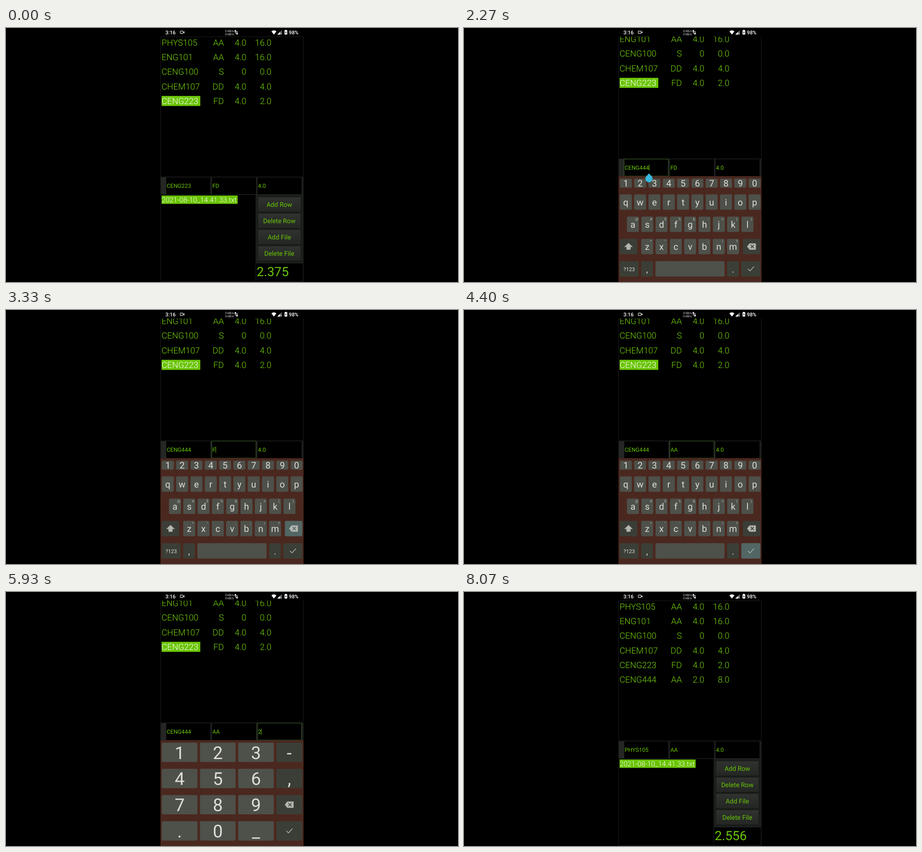
These frames come from a looping animation (998 by 561 pixels, 8.47 s). An HTML page with a canvas:

```html
<!DOCTYPE html>
<html lang="en">
<head>
<meta charset="utf-8">
<title>Grade calculator</title>
<style>
html, body { margin: 0; height: 100%; overflow: hidden; background: #000; }
canvas { display: block; }
</style>
</head>
<body>
<canvas id="stage" width="998" height="561"></canvas>
<script>
const c = document.getElementById('stage').getContext('2d');
c.textRendering = 'geometricPrecision';
const LOOP = 8470, STEP = 200 / 3;
const GREEN = '#6ac507', THIN_GREEN = '#78d60c', MARK = '#69c400', EDGE = '#1c1e1c';
const KEY = '#4e504a', DARK = '#3b3e36', PRESSED = '#526664', INK = '#deded9';
const FIELD_X = [354, 455, 555.5];

// Timelines: [step, value] pairs, each value holding until the next.
const fields = [
  [[0, 'CENG223'], [10, 'CENG22'], [11, 'CENG2'], [12, 'CENG'], [20, 'CENG4'],
   [22, 'CENG44'], [26, 'CENG444'], [108, 'PHYS105']],
  [[0, 'FD'], [49, 'F'], [51, ''], [59, 'A'], [64, 'AA']],
  [[0, '4.0'], [79, '4.'], [80, '4'], [81, ''], [89, '2'], [95, '2.'], [96, '2.0'], [108, '4.0']]
];
const focusAt = [[0, -1], [1, 0], [43, 1], [72, 2], [105, -1]];
const boardAt = [[0, ''], [4, 'abc'], [38, ''], [45, 'abc'], [67, ''], [73, 'num'], [101, '']];
const panAt = [[-9, 0], [4.5, 40], [38, 0], [45.5, 40], [67, 0], [73.5, 40], [101, 0]];
const pressAt = [[0, ''], [9, 'back'], [13, ''], [19, '4'], [20, ''], [25, '4'], [26, ''],
  [36, 'ok'], [38, ''], [48, 'back'], [52, ''], [55, 'shift'], [56, ''], [58, 'A'], [59, ''],
  [60, 'shift'], [61, ''], [63, 'A'], [64, ''], [66, 'ok'], [67, ''], [78, 'back'], [82, ''],
  [88, '2'], [89, ''], [94, '.'], [95, '0'], [96, ''], [100, 'ok'], [101, ''],
  [106, 'Add Row'], [108, '']];
const shiftAt = [[0, false], [56, true], [59, false], [61, true], [64, false]];
const caretAt = [[0, true], [65, false], [72, true], [84, false], [86, true]];
const dropAt = [[0, false], [1, true], [42, false], [43, true], [50, false], [72, true], [79, false]];

const rows = [
  ['PHYS105', 'AA', '4.0', '16.0'], ['ENG101', 'AA', '4.0', '16.0'],
  ['CENG100', 'S', '0', '0.0'], ['CHEM107', 'DD', '4.0', '4.0'],
  ['CENG223', 'FD', '4.0', '2.0'], ['CENG444', 'AA', '2.0', '8.0']
];

const last = (line, k) => line.filter(e => e[0] <= k).pop();
const at = (line, k) => last(line, k)[1];

function panOf(k) {
  const [start, goal] = last(panAt, k);
  const left = 1 - Math.min(1, (k - start) / 2.75);
  return -(goal + (40 - 2 * goal) * left * left);
}

function box(x, y, w, h, fill) {
  c.fillStyle = fill;
  c.fillRect(x, y, w, h);
}

function frame(x, y, w, h, color) {
  c.strokeStyle = color;
  c.lineWidth = 1;
  c.strokeRect(x, y, w, h);
}

function rounded(x, y, w, h, r, fill) {
  c.beginPath();
  c.roundRect(x, y, w, h, r);
  c.fillStyle = fill;
  c.fill();
}

function poly(points, fill) {
  c.beginPath();
  points.forEach(p => c.lineTo(...p));
  c.fillStyle = fill;
  c.fill();
}

function line(points, color, width) {
  c.beginPath();
  points.forEach(p => c.lineTo(...p));
  c.strokeStyle = color;
  c.lineWidth = width;
  c.stroke();
}

// Text with its capitals centred on y.
function text(s, x, y, size, color, align = 'left', weight = 400) {
  c.font = `${weight} ${size}px Roboto, sans-serif`;
  c.textAlign = align;
  c.fillStyle = color;
  c.fillText(s, x, y + size * 0.356);
}

function statusBar() {
  box(341, 0, 316, 19, '#000');
  text('3:16', 352, 10, 11.4, '#fff', 'left', 500);
  c.beginPath();
  c.roundRect(384.7, 6.7, 6.2, 5.6, 1);
  c.strokeStyle = '#ddd';
  c.lineWidth = 1.2;
  c.stroke();
  poly([[391, 9.5], [394, 6.8], [394, 12.2]], '#ddd');
  text('0 kB/s', 484, 6.4, 6.6, '#eee');
  text('0 kB/s', 484, 13.6, 6.6, '#eee');
  line([[506.5, 12], [506.5, 4.5]], '#fff', 1.4);
  poly([[503.8, 7.5], [506.5, 4], [509.2, 7.5]], '#fff');
  line([[510, 7], [510, 14]], '#fff', 1.4);
  poly([[507.3, 11.5], [510, 15], [512.7, 11.5]], '#fff');
  c.beginPath();
  c.moveTo(591.5, 14.5);
  c.lineTo(586, 7.5);
  c.quadraticCurveTo(591.5, 3.2, 597, 7.5);
  c.fillStyle = '#fff';
  c.fill();
  poly([[599, 14.5], [609, 4.8], [609, 14.5]], '#666');
  poly([[599, 14.5], [605, 8.7], [605, 14.5]], '#fff');
  text('x', 607.3, 12.2, 6, '#fff', 'center');
  rounded(615, 5, 6, 9.6, 1, '#fff');
  box(616.7, 4, 2.6, 1.5, '#fff');
  poly([[618.6, 6.3], [616.4, 10.2], [617.8, 10.2], [617.4, 13.2], [619.6, 9.2], [618.2, 9.2]], '#000');
  text('98%', 624.5, 10, 11.3, '#fff', 'left', 500);
}

function app(k, pressed) {
  const done = k >= 108, focus = at(focusAt, k);
  c.save();
  c.beginPath();
  c.rect(341, 19, 316, 542);
  c.clip();
  c.translate(0, panOf(k));

  frame(341.5, 19.5, 315, 540, EDGE);
  rows.slice(0, done ? 6 : 5).forEach((row, i) => {
    const y = 32.6 + 32.05 * i, chosen = i === 4 && !done;
    if (chosen) box(343.5, 150, 85.5, 22.3, MARK);
    text(row[0], 343.5, y, 19, chosen ? '#fff' : THIN_GREEN, 'left', 300);
    [481, 530.5, 586].forEach((x, j) => text(row[j + 1], x, y, 19, THIN_GREEN, 'right', 300));
  });

  box(342, 328.5, 314, 39.5, EDGE);
  box(342, 330, 11.5, 37, '#242724');
  FIELD_X.forEach((x, i) => {
    box(x, 330, 97, 37, '#000');
    if (i === focus) frame(x - 0.5, 329.5, 97.5, 37.5, '#3b5f26');
    const s = at(fields[i], k);
    text(s, x + 0.7, 348.5, 12.5, GREEN);
    if (i === focus && at(caretAt, k)) box(x + 0.7 + c.measureText(s).width, 341.5, 1, 13.5, GREEN);
  });

  frame(341.5, 368, 210, 191.5, EDGE);
  box(343.5, 370, 168, 18.5, MARK);
  text('2021-08-10_14.41.33.txt', 343.8, 379.3, 15.6, '#fff', 'left', 300);

  box(552, 368, 104, 151, '#1b1e1b');
  ['Add Row', 'Delete Row', 'Add File', 'Delete File'].forEach((label, i) => {
    const y = 374 + 36 * i, shade = c.createLinearGradient(0, y, 0, y + 32);
    shade.addColorStop(0, '#2f322f');
    shade.addColorStop(1, '#232623');
    rounded(557, y, 93, 32, 1, label === pressed ? '#35606f' : shade);
    line([[557, y + 32.5], [650, y + 32.5]], '#111311', 1);
    text(label, 603.5, y + 16.3, 14.3, GREEN, 'center');
  });
  frame(551.5, 519.5, 104.5, 40, EDGE);
  text(done ? '2.556' : '2.375', 553.5, 538, 28.2, GREEN);
  c.restore();
}

function backIcon(x, y, ground) {
  poly([[x - 10, y], [x - 4.5, y - 7], [x + 9.5, y - 7], [x + 9.5, y + 7], [x - 4.5, y + 7]], '#b2b5ae');
  line([[x - 2, y - 3.5], [x + 5, y + 3.5]], ground, 1.7);
  line([[x - 2, y + 3.5], [x + 5, y - 3.5]], ground, 1.7);
}

function key(label, x, y, w, h, size, pressed, dark) {
  const ground = label && label === pressed ? PRESSED : dark ? DARK : KEY;
  const cx = x + w / 2, cy = y + h / 2;
  rounded(x, y, w, h, 3, ground);
  if (label === 'back') backIcon(cx, cy, ground);
  else if (label === 'ok') line([[cx - 6.5, cy], [cx - 2, cy + 4.5], [cx + 7, cy - 5]], '#b2b5ae', 1.5);
  else if (label === 'shift') {
    const arrow = [[0, -8], [9.5, 1], [4.5, 1], [4.5, 7], [-4.5, 7], [-4.5, 1], [-9.5, 1]];
    poly(arrow.map(([a, b]) => [cx + a, cy + b]), '#b2b5ae');
  } else text(label, cx, cy + 0.6, size, INK, 'center');
}

function letters(k, pressed) {
  const upper = at(shiftAt, k);
  let popup;
  const row = (labels, x, y, h, hints = '') => [...labels].forEach((ch, i) => {
    const label = upper ? ch.toUpperCase() : ch, left = x + 31.6 * i;
    key(label, left, y, 26.5, h, 20, '');
    if (hints) text(hints[i], left + 21.5, y + 5.5, 8, '#b9bab4', 'center');
    if (label === pressed) popup = [label, left + 13.2, y + h / 2];
  });
  row('1234567890', 344, 332.7, 20);
  row('qwertyuiop', 344, 367.5, 34);
  row('asdfghjkl', 359.8, 416.5, 34, '@#$%&-+()');
  row('zxcvbnm', 391.2, 465.7, 34, '*"\':;!?');
  key('shift', 344, 465.7, 38.5, 34, 20, pressed, true);
  key('back', 615.7, 465.7, 38.5, 34, 20, pressed, true);
  key('?123', 344, 515, 41.5, 34, 11.5, pressed, true);
  key(',', 391.2, 515, 26, 34, 20, pressed, true);
  key('', 422.7, 515, 152.5, 34, 20, pressed);
  key('.', 580.8, 515, 26, 34, 20, pressed, true);
  key('ok', 612.3, 515, 42, 34, 20, pressed, true);
  if (popup) {
    const [label, x, y] = popup;
    rounded(x - 17.5, y - 64, 35, 90, 3, PRESSED);
    text(label, x, y - 38, 28, '#f2f2f0', 'center');
  }
}

function numbers(pressed) {
  ['1', '2', '3', '-', '4', '5', '6', ',', '7', '8', '9', 'back', '.', '0', '_', 'ok'].forEach((label, i) => {
    const col = i % 4;
    key(label, 344 + 84.3 * col, 332.8 + 57.8 * (i >> 2), col < 3 ? 78.7 : 57.2, 42.7, 39, pressed, col === 3);
  });
}

function drop(k, board) {
  const i = at(focusAt, k);
  if (i < 0 || !at(dropAt, k)) return;
  c.font = '400 12.5px Roboto, sans-serif';
  const x = FIELD_X[i] + 0.7 + c.measureText(at(fields[i], k)).width;
  // The handle trails the page while the keyboard opens.
  const y = 361 + (board ? 0.75 * panOf(k - 0.65) : panOf(k));
  c.beginPath();
  c.moveTo(x, y - 10);
  c.quadraticCurveTo(x + 2, y - 7, x + 6, y - 3.5);
  c.arc(x, y + 1.8, 8, -0.72, Math.PI + 0.72);
  c.quadraticCurveTo(x - 2, y - 7, x, y - 10);
  c.fillStyle = '#36b9df';
  c.fill();
}

function draw(t) {
  const k = Math.floor((t % LOOP + 4) / STEP);
  const board = at(boardAt, k), pressed = at(pressAt, k);
  box(0, 0, 998, 561, '#000');
  app(k, pressed);
  statusBar();
  if (board) {
    box(341, 327.5, 316, 234, '#4a281f');
    if (board === 'abc') letters(k, pressed);
    else numbers(pressed);
  }
  drop(k, board);
}

const begin = performance.now();
function tick() {
  draw(performance.now() - begin);
  requestAnimationFrame(tick);
}
tick();
</script>
</body>
</html>
```
